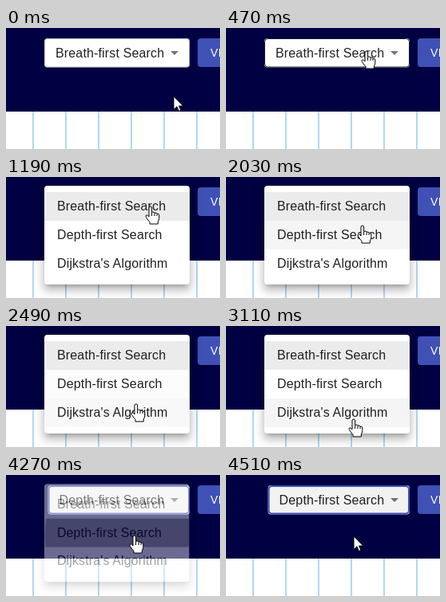
An HTML page that plays this animation: 268 px wide and 152 px high, repeating every 4.74 s.

```html
<!DOCTYPE html>
<html lang="en">
<head>
<meta charset="utf-8">
<title>Algorithm select</title>
<style>
  html, body { margin: 0; width: 100%; height: 100%; overflow: hidden; background: #fff; }
  svg { display: block; width: 100vw; height: 100vh; }
  text { font: 16px "Liberation Sans", Arial, sans-serif; letter-spacing: .15px; fill: rgba(0,0,0,.87); }
  #button text { font-size: 14px; font-weight: 500; letter-spacing: .4px; fill: #fff; }
</style>
</head>
<body>
<svg viewBox="0 0 268 152">
  <defs>
    <clipPath id="rowClip"><rect x="48" y="55" width="182" height="36"/></clipPath>
  </defs>
  <rect width="268" height="152" fill="#fff"/>
  <g id="grid" fill="#aFd8f8"></g>
  <rect width="268" height="105" fill="#000042"/>
  <g id="button">
    <rect x="240" y="13" width="120" height="36" rx="4" fill="#3f51b5"/>
    <text x="256" y="36">VISUALIZE</text>
  </g>
  <rect id="box" y="13" height="36.5" rx="4" fill="#fff"/>
  <rect id="border" rx="4" fill="none"/>
  <text id="value" y="37"></text>
  <path id="caret" d="M206 29l5 5 5-5z" fill="rgba(0,0,0,.54)"/>
  <g id="menu">
    <g id="shadow"></g>
    <rect x="48" y="11" width="182" height="124" rx="4" fill="#fff"/>
    <g id="rows"></g>
    <circle id="ripple" cx="162" cy="76" clip-path="url(#rowClip)"/>
    <g id="labels"></g>
  </g>
  <g id="cursor" fill="#fff" stroke="#000" stroke-linejoin="round">
    <path id="arrow" d="M0 0V16.5L4 12.8 6.5 18.5 9 17.4 6.6 12H11.8Z"/>
    <g id="hand">
      <path d="M-2 2Q-2 0-.2 0T1.6 2V7.3Q4.6 6.2 5 8.2 7.6 7.2 8 9.3 10.6 8.5 10.8 11V14.5Q10.8 17 9.3 19V22H-1V19.5Q-3 17.5-5.6 13.5-6.8 11-4.8 10.8-3.5 10.8-2 13Z"/>
      <path d="M1.6 7.5V12M5 8.5V12M8 9.5V12" fill="none"/>
    </g>
  </g>
</svg>
<script>
const LOOP = 4740, STEP = 77.7;
const OPEN = 755, PRESS = 3860, CLOSE = 4177, FADE = 251;
const names = ["Breath-first Search", "Depth-first Search", "Dijkstra's Algorithm"];

// Pointer hot spot: time, x, y
const track = [
  [30, 210, 86], [544, 174, 25], [622, 181, 25], [780, 181, 25], [850, 181, 37],
  [1560, 181, 37], [2020, 171, 61], [2098, 171, 64], [2110, 171, 64],
  [2642, 161, 107], [2875, 160, 118], [3035, 160, 118], [3108, 160, 117],
  [3574, 161, 93], [3730, 161, 76], [4430, 161, 76], [4500, 160, 77]
];

const $ = id => document.getElementById(id);
const clamp = v => Math.max(0, Math.min(1, v));

function add(parent, tag, attrs, label) {
  const el = document.createElementNS("http://www.w3.org/2000/svg", tag);
  set(el, attrs);
  if (label) el.textContent = label;
  return parent.appendChild(el);
}

function set(el, attrs) {
  for (const key in attrs) el.setAttribute(key, attrs[key]);
}

const show = (el, on) => set(el, { visibility: on ? "visible" : "hidden" });

// cubic-bezier(.4, 0, .2, 1)
function ease(x) {
  x = clamp(x);
  let lo = 0, hi = 1;
  for (let i = 0; i < 20; i++) {
    const u = (lo + hi) / 2, w = 1 - u;
    if (1.2 * w * w * u + .6 * w * u * u + u * u * u < x) lo = u; else hi = u;
  }
  return lo * lo * (3 - 2 * lo);
}

function pointer(t) {
  const i = track.findIndex(p => p[0] > t);
  if (i === 0) return track[0].slice(1);
  if (i < 0) return track[track.length - 1].slice(1);
  const a = track[i - 1], b = track[i];
  const u = (t - a[0]) / (b[0] - a[0]), s = u * u * (3 - 2 * u);
  return [a[1] + (b[1] - a[1]) * s, a[2] + (b[2] - a[2]) * s];
}

// Share of the hover transition that row has gone through
function hover(row, t) {
  const hits = [0, 50, 100].filter(d => Math.floor((pointer(t - d)[1] - 19) / 36) === row);
  return hits.length / 3;
}

for (let x = 33; x < 268; x += 41) add($("grid"), "rect", { x, y: 105, width: 2, height: 47 });

// Offset, blur, spread and opacity of each shadow layer
for (const [dy, blur, spread, alpha] of [[5, 5, -3, .2], [8, 10, 1, .14], [3, 14, 2, .12]]) {
  add($("shadow"), "rect", {
    x: 48 - spread, y: 11 + dy - spread, width: 182 + 2 * spread, height: 124 + 2 * spread,
    rx: 4, "fill-opacity": alpha, style: `filter: blur(${blur / 2}px)`
  });
}

const rows = names.map((name, i) => {
  add($("labels"), "text", { x: 64, y: 42 + 36 * i }, name);
  return add($("rows"), "rect", { x: 48, y: 19 + 36 * i, width: 182, height: 36 });
});

function drawSelect(t, picked, y) {
  const left = picked ? 52.6 : 48, focused = t > 800;
  const inset = focused ? 1 : .5;
  set($("box"), { x: left, width: 230 - left, fill: focused ? "#f2f2f2" : "#fff" });
  set($("border"), {
    x: left + inset, y: 13 + inset, width: 230 - left - 2 * inset, height: 36.5 - 2 * inset,
    "stroke-width": 2 * inset,
    stroke: focused ? "#3f51b5" : `rgba(0,0,0,${y < 50 ? .87 : .23})`
  });
  set($("value"), { x: left + 14 });
  $("value").textContent = names[picked];
  set($("caret"), { transform: focused && t < CLOSE ? "rotate(180 211 31)" : "" });
}

function drawMenu(t, picked) {
  const closing = t >= CLOSE;
  const since = t - (closing ? CLOSE : OPEN);
  const fade = ease(since / FADE);
  const grow = ease((since - (closing ? FADE / 3 : 0)) / (FADE * 2 / 3));
  const scale = closing ? 1 - .25 * grow : .75 + .25 * grow;
  const alpha = closing ? 1 - fade : fade;
  show($("menu"), t > 800 && alpha > 0);
  set($("menu"), {
    opacity: alpha,
    transform: `translate(48 36) scale(${scale} ${scale * scale}) translate(-48 -36)`
  });
  rows.forEach((row, i) => set(row, {
    "fill-opacity": i === picked ? .08 : .04 * hover(i, t)
  }));
  const press = ease((t - PRESS) / 550);
  set($("ripple"), { r: 118 * press, "fill-opacity": t < PRESS ? 0 : .1 + .2 * press });
}

function render(time) {
  const t = Math.floor((time % LOOP + 12) / STEP) * STEP;
  const picked = t < CLOSE ? 0 : 1;
  const [x, y] = pointer(t);
  drawSelect(t, picked, y);
  drawMenu(t, picked);
  const onLink = y < 50 || (t > 700 && t < 4450);
  show($("hand"), onLink);
  show($("arrow"), !onLink);
  set($("cursor"), { transform: `translate(${Math.round(x)} ${Math.round(y)})` });
}

const start = performance.now();
function tick() {
  render(performance.now() - start);
  requestAnimationFrame(tick);
}
tick();
</script>
</body>
</html>
```
